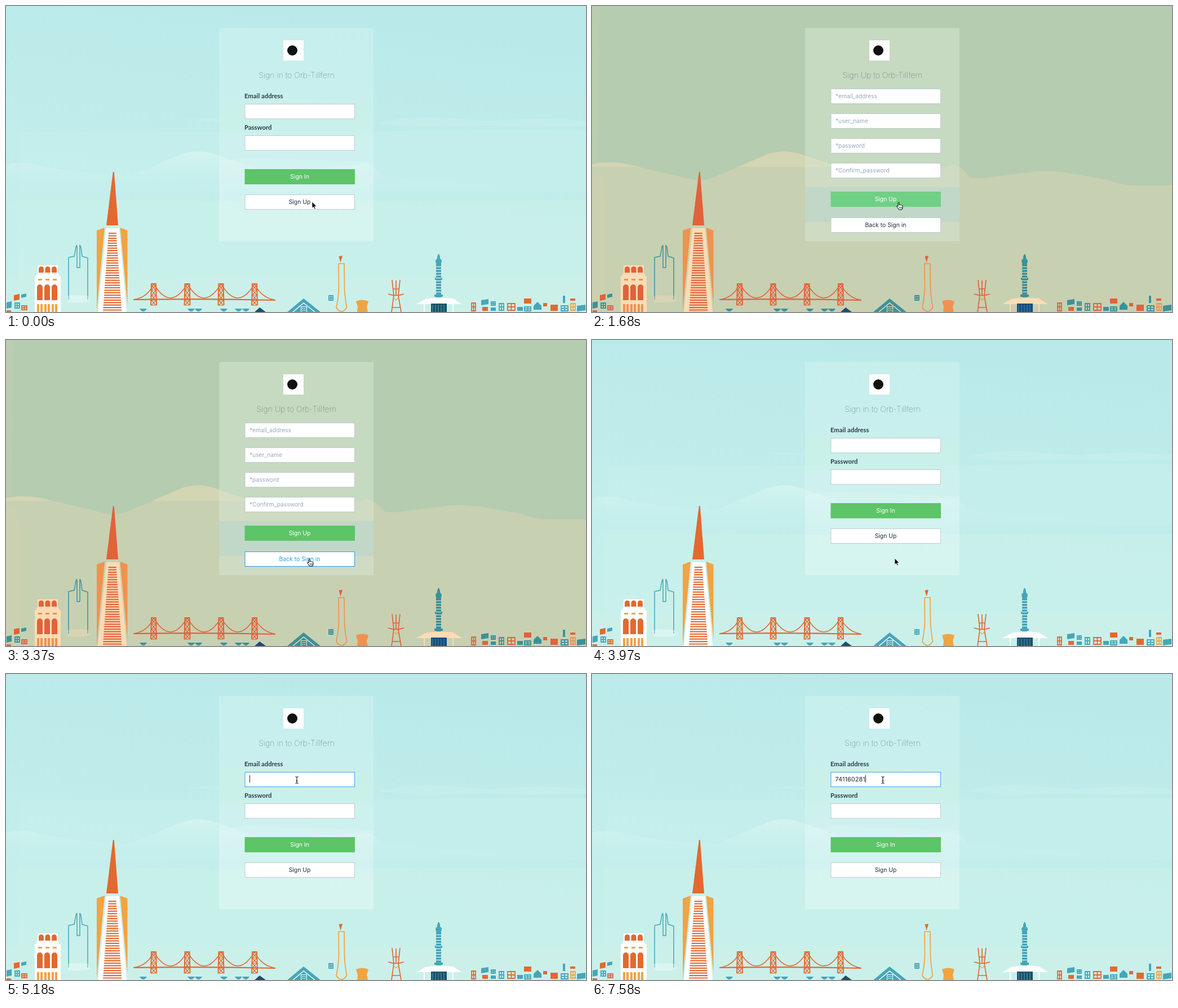
These frames come from a looping animation (1029 by 544 pixels, 8000 ms). An HTML page:

```html
<!DOCTYPE html>
<html lang="en">
<head>
<meta charset="utf-8">
<title>Sign in</title>
<style>
html, body { margin: 0; width: 100%; height: 100%; overflow: hidden; }
svg { display: block; width: 1029px; height: 544px; --o: #e3692f; --a: #f2a342; --w: #fefefe; --t: #45a7b9; --d: #1d5068; }
svg.up { --o: #e2623a; --a: #f0924f; --w: #fbdcb5; --t: #39929b; --d: #1b4a80; }
svg .signup, svg.up .signin { display: none; }
svg.up .signup { display: inline; }
text { font: 10.4px Inter, "Noto Sans", sans-serif; font-feature-settings: "calt" 0; fill: #1f2d3d; white-space: pre; }
.title { font-size: 14.2px; font-weight: 100; fill: #43555a; }
.label { font: 700 11.3px Lato, "Open Sans", sans-serif; fill: #2b3d4b; }
.hint { font-size: 10.2px; fill: #97a8be; }
.typed { font-size: 11px; }
</style>
</head>
<body>
<svg id="stage" viewBox="0 0 1029 544">
  <defs>
    <linearGradient id="sky" x1=".2" y1="1" x2=".45" y2="0">
      <stop stop-color="#c7f0eb"/><stop offset=".5" stop-color="#c1edeb"/><stop offset="1" stop-color="#b9eae9"/>
    </linearGradient>
    <linearGradient id="mist" x2="0" y2="1">
      <stop stop-color="#d4f4ef"/><stop offset="1" stop-color="#c8f0ec" stop-opacity="0"/>
    </linearGradient>
    <clipPath id="crest"><rect y="250" width="500" height="36"/></clipPath>
    <path id="hills" d="M0 281Q30 275 62 281L180 309Q197 313 220 303L310 264Q340 253 372 264L440 287Q550 310 640 282Q655 284 668 303Q680 309 700 305L790 294Q815 292 850 298L915 309Q935 318 960 319H1029V544H0Z"/>
  </defs>
  <g class="signin">
    <rect width="1029" height="544" fill="url(#sky)"/>
    <path d="M25 224H640Q800 219 1029 221V330H25Z" fill="#c6f0ed" opacity=".6"/>
    <path d="M310 202Q350 198 390 202L380 206ZM660 209Q720 193 780 199L860 205Q950 196 1029 205V213Q930 216 850 212L740 215Z" fill="#c6efec" opacity=".8"/>
    <path d="M0 282Q30 274 64 285L130 296L220 302L310 264Q340 253 372 264L460 294L640 282Q656 286 668 303L985 328H0Z" fill="url(#mist)"/>
    <path d="M20 346H1029V544H20Z" fill="#caf1ea" opacity=".7"/>
    <path d="M0 485H1029V544H0Z" fill="#cdf1eb" opacity=".6"/>
    <path d="M378 39H652V418H378Z" fill="#fff" opacity=".17"/>
    <path d="M378 172Q440 164 500 166L652 176V232H378Z" fill="#caf1e5" opacity=".5"/>
    <path d="M378 276L430 270L652 278V418H378Z" fill="#fff" opacity=".1"/>
  </g>
  <g class="signup">
    <rect width="1029" height="544" fill="#b5ccb0"/>
    <path d="M0 0H14L10 280H0Z" fill="#c0ceb0" opacity=".6"/>
    <use href="#hills" fill="#c8d0b2"/>
    <use href="#hills" fill="#d4d5b3" clip-path="url(#crest)"/>
    <path d="M0 300H16L24 344V544H0Z" fill="#cdd1b0" opacity=".6"/>
    <path d="M378 39H652V418H378Z" fill="#d7e8d4" opacity=".5"/>
    <path d="M378 322H652V384H378Z" fill="#b9d6cb" opacity=".6"/>
  </g>
  <g id="city"></g>
  <rect x="492" y="61" width="36" height="36" fill="#fff"/>
  <circle cx="508" cy="79" r="9" fill="#111"/>
  <g id="ui"></g>
</svg>
<script>
const $ = id => document.getElementById(id);
const area = (d, c) => `<path d="${d}" fill="var(--${c})"/>`;
const line = (d, c, w = 1.6) => `<path d="${d}" fill="none" stroke="var(--${c})" stroke-width="${w}"/>`;
const box = (x, y, w, h, c) => area(`M${x} ${y}h${w}v${h}h${-w}z`, c);
const arch = (x, y, w, h, c) => area(`M${x} ${y + h}v${w / 2 - h}a${w / 2} ${w / 2} 0 0 1 ${w} 0v${h - w / 2}z`, c);
const panes = (x, y, w, h, c) =>
  line(`M${x} ${y}h${w}v${h}h${-w}zM${x + w / 2} ${y}v${h}M${x} ${y + h / 2}h${w}`, c, 1.8);
const slant = (x, y, w, h, c) => area(`M${x} ${y + 2}l${w} -2v${h}l${-w} 2z`, c);

function pyramid() {
  let s = area("M189.800 295h2L199 390H178Z", "o") + area("M178 395h22.500L214 544H163Z", "w") +
    area("M161 399L175 394L163 520L161 544Z", "a") + area("M202.500 394L215.500 399V532Z", "a");
  for (let y = 403; y < 544; y += 4.4) {
    const half = 7 + (y - 403) * .07;
    s += box(188.700 - half, y, 2 * half, 2.2, "o");
  }
  return s;
}

function arcade() {
  let s = box(56, 461, 36, 17, "w") + box(54, 476, 40, 4, "w") + box(51, 480, 46, 64, "w");
  for (let i = 0; i < 3; i++) {
    s += arch(58 + i * 11.5, 463, 9, 11, "o") + arch(55 + i * 13, 495, 10, 28, "o") +
      box(57 + i * 13, 485, 7, 3, "a") + box(55 + i * 13, 530, 4, 14, "a") + box(61 + i * 13, 530, 4, 14, "a");
  }
  return s;
}

function bridge() {
  const xs = [262, 321.5, 381.5, 441];
  let cable = "M226 522Q251 519 262 494", s = "";
  xs.forEach((x, i) => {
    if (i) cable += `Q${(x + xs[i - 1]) / 2} 544 ${x} 494`;
    s += line(`M${x - 4} 493L${x - 5} 532M${x + 4} 493L${x + 5} 532M${x - 4} 494h8`, "o", 2);
    for (let y = 496; y < 530; y += 9)
      s += line(`M${x - 4} ${y}l8 9m0 -9l-8 9h8`, "o", 1.2);
  });
  return s + line(cable + "Q453 519 478 523", "o") + line("M226 522Q352 520 478 523", "o", 2.2);
}

function towers() {
  let s = line("M111 522V447L121 445L124 429L125.500 425L126 429V465H131V429L131 425L133 429L135 445L145 448V522", "t", 1.5) +
    `<path d="M108 516l8 -2l30 1l4 9l-10 3H110z" fill="var(--w)" opacity=".3"/>`;
  // Flask tower and jug
  s += line("M590 458H600L600.500 500Q601 518 604.500 536Q600 543 595.500 543Q590 543 586 536Q590 518 590.500 500Z", "a", 1.7) +
    area("M590.500 445L597 444L593.500 456Z", "o") + area("M621 525Q632 520 643 525L640 535L642 544H623L624 535Z", "a");
  // Masts
  s += line("M685 487L688 515L684 544M699 487L696 515L701 544M692 488V515M685 536H700", "o", 1.7) +
    line("M678 512Q692 517 706 512M687 503H698", "o", 1.7) + line("M686 517L692 523L698 517", "a", 1.2);
  // Striped column on a wide roof
  s += area("M728 530L744 521Q767 517 793 520L809 530Z", "w") + box(754, 529, 28, 15, "d") +
    area("M765 446Q767.500 436 770 446V449H765Z", "t") + `<ellipse cx="767.500" cy="454" rx="5.500" ry="5.500" fill="var(--t)"/>` +
    box(763, 458, 9, 60, "t") + box(761, 483, 13, 4, "t") + box(760, 513, 15, 4, "t");
  for (let y = 463; y < 512; y += 5) s += box(763, y, 9, 1, "w");
  for (let x = 757; x < 782; x += 5) s += line(`M${x} 531v13`, "t", 1);
  return s + line("M742 530V544M793 530V544", "w", 2);
}

function houses() {
  let s = "";
  for (const x of [237, 322, 335, 380, 406, 419]) s += area(`M${x} 538h13q-3 5 -6.500 5t-6.500 -5z`, "t");
  s += area("M441 544L450 536L461 544Z", "d") + area("M499 544L528 520L558 544Z", "t") +
    line("M509 544L528 528L548 544", "w", 1.4) + box(523, 534, 11, 10, "w") + panes(525, 536, 7, 7, "t") +
    panes(573, 515, 7, 8, "t");
  s += slant(1, 525, 9, 11, "t") + slant(14, 512, 10, 10, "o") + slant(27, 511, 9, 6, "t") +
    panes(16, 528, 8, 9, "t") + panes(28, 533, 9, 7, "o") + box(1, 541, 8, 3, "o");
  s += panes(826, 528, 7, 14, "o") + slant(843, 521, 13, 9, "t") + box(845, 535, 10, 7, "o") +
    panes(861, 526, 7, 6, "t") + box(860, 536, 9, 6, "t") + panes(875, 529, 8, 12, "t") +
    panes(890, 529, 13, 12, "o") + box(907, 535, 10, 7, "t") + box(919, 520, 13, 9, "o") +
    panes(920, 535, 11, 7, "t") + area("M936 533L943 526L950 533V540H936Z", "t") +
    box(953, 528, 7, 6, "o") + box(966, 531, 13, 11, "o") + panes(985, 533, 12, 9, "t") +
    box(988, 515, 4, 13, "t") + panes(1002, 529, 8, 12, "a") + box(1001, 520, 9, 4, "o") +
    slant(1013, 531, 15, 10, "t");
  return s;
}

$("city").innerHTML = pyramid() + arcade() + bridge() + towers() + houses();

const BRAND = "Orb-Tillfern", ENTRY = "741160281", LEFT = 423.5, WIDE = 195.5, TALL = 27;
const field = (y, hint = "") => ({ y, hint });
const button = (y, name, green) => ({ y, name, green });
const PAGES = {
  in: {
    title: "Sign in to " + BRAND, labels: [["Email address", 163.5], ["Password", 219.5]],
    parts: [field(174), field(230), button(290, "Sign In", true), button(335, "Sign Up")]
  },
  up: {
    title: "Sign Up to " + BRAND, labels: [],
    parts: [field(147, "*email_address"), field(191, "*user_name"), field(235, "*password"),
      field(279, "*Confirm_password"), button(330, "Sign Up", true), button(376, "Back to Sign in")]
  }
};

// Pointer stops: time, x, y, page
const STOPS = [
  [0, 543, 348, "in"], [1500, 543, 349, "in"], [1680, 543, 349, "up"],
  [2570, 543, 318, "up"], [2730, 543, 286, "up"], [2890, 542, 254, "up"], [3050, 541, 290, "up"],
  [3210, 539, 345, "up"], [3370, 537, 389, "up"],
  [3970, 537, 388, "in"], [4120, 535, 372, "in"], [4280, 530, 334, "in"], [4430, 523, 268, "in"],
  [4590, 518, 212, "in"], [4740, 516, 188, "in"]
];
const KEYS = [5480, 5780, 6080, 6230, 6530, 6680, 6980, 7280, 7580];
const FOCUS = 5030, CARET = 5180, LOOP = 8000;

const POINTERS = {
  arrow: `<path d="M0 0V11.500L2.600 9L4.500 13L6.300 12.200L4.500 8.300H8Z" fill="#000" stroke="#fff" stroke-width=".8"/>`,
  hand: `<path d="M0 1Q0 0 1 0T2 1V5Q4 4 4.500 5Q6 4.500 6.500 5.500Q8 5 8 7V9Q8 11 7 13H1.500Q0 10 -2.500 7.500Q-2.500 6 -1 6.500L0 7.500Z" fill="#fff" stroke="#000"/><path d="M2.500 8v3M4.400 8v3M6.200 8v3" stroke="#000" stroke-width=".7"/>`,
  beam: `<path d="M-2.500 -5.500Q0 -5.500 0 -4Q0 -5.500 2.500 -5.500M0 -4V5M-2.500 6.500Q0 6.500 0 5Q0 6.500 2.500 6.500M-1.500 2h3" fill="none" stroke="#000"/>`
};

const frame = (y, fill, edge) =>
  `<rect x="${LEFT + .5}" y="${y + .5}" width="${WIDE - 1}" height="${TALL - 1}" fill="${fill}" stroke="${edge}"/>`;

function drawPart(p, over, focused, typed) {
  if (p.name) {
    const green = over ? "#70d084" : "#5dc467", blue = "#2f9bea";
    const ink = p.green ? "#fff" : over ? blue : "#1f2d3d";
    return frame(p.y, p.green ? green : "#fff", p.green ? green : over ? blue : "#c2ccd0") +
      `<text x="521" y="${p.y + 17.3}" text-anchor="middle" style="fill:${ink}">${p.name}</text>`;
  }
  return frame(p.y, "#fff", focused ? "#3aa2f5" : over ? "#8391a5" : "#bfcbd3") +
    (p.hint ? `<text class="hint" x="432" y="${p.y + 16.8}">${p.hint}</text>` : "") +
    (focused ? `<text id="typed" class="typed" x="431.500" y="${p.y + 17}">${typed}</text>` : "");
}

let last = "";
function render(now) {
  const t = now % LOOP;
  const [start, x, y, name] = STOPS.findLast(s => s[0] <= t);
  const page = PAGES[name];
  const hover = start > 0 && page.parts.find(p => y >= p.y && y < p.y + TALL);
  const typed = ENTRY.slice(0, KEYS.filter(k => k <= t).length);
  const pointer = !hover ? "arrow" : hover.name ? "hand" : "beam";
  const state = [start, typed, t >= FOCUS, t >= CARET].join();
  if (state !== last) {
    last = state;
    $("stage").setAttribute("class", name);
    $("ui").innerHTML = `<text class="title" x="515.500" y="128" text-anchor="middle">${page.title}</text>` +
      page.labels.map(([s, ly]) => `<text class="label" x="423" y="${ly}">${s}</text>`).join("") +
      page.parts.map((p, i) => drawPart(p, p === hover, t >= FOCUS && i === 0, typed)).join("") +
      (t >= CARET ? `<path id="caret" d="M.5 180V193" stroke="#1f2d3d"/>` : "") +
      `<g transform="translate(${x} ${y})">${POINTERS[pointer]}</g>`;
    if (t >= CARET) {
      const end = typed ? $("typed").getComputedTextLength() : 0;
      $("caret").setAttribute("transform", `translate(${Math.round(431.7 + end)})`);
    }
  }
  requestAnimationFrame(() => render(performance.now()));
}
render(performance.now());
</script>
</body>
</html>
```
